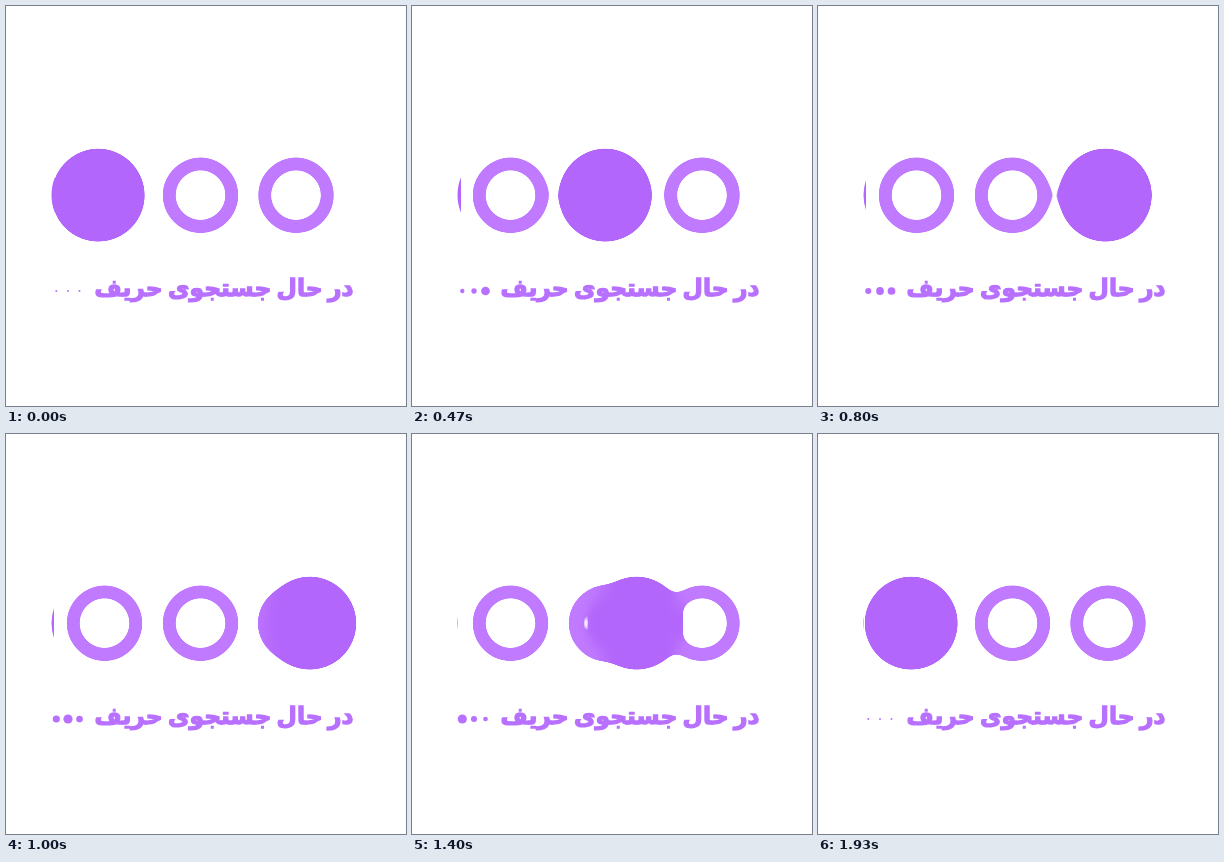
These frames come from a looping animation (400x400 px, 1990 ms). An HTML page:

```html
<!DOCTYPE html>
<html lang="fa">
<head>
<meta charset="utf-8">
<style>
  html, body { margin: 0; width: 100%; height: 100%; overflow: hidden; background: #fff; }
  svg { display: block; width: 400px; height: 400px; }
  text {
    font: bold 25px "DejaVu Sans", "Noto Sans", sans-serif; word-spacing: -.12em;
    direction: rtl; text-anchor: middle; stroke: #b870ff; stroke-width: 1.3;
  }
  .ring { fill: none; stroke: #c07aff; stroke-width: 11; }
  .ball { fill: #b366fb; }
  .label { fill: #b870ff; }
</style>
</head>
<body>
<svg viewBox="0 0 400 400">
  <defs>
    <filter id="goo" filterUnits="userSpaceOnUse" x="0" y="100" width="400" height="180" color-interpolation-filters="sRGB">
      <feGaussianBlur stdDeviation="6.5"/>
      <feColorMatrix values="1 0 0 0 0  0 1 0 0 0  0 0 1 0 0  0 0 0 30 -12.2"/>
    </filter>
    <clipPath id="edge"><rect id="strip" x="40" y="140" height="100"/></clipPath>
  </defs>
  <circle class="ball" cx="92" cy="189" r="46.5" clip-path="url(#edge)"/>
  <g filter="url(#goo)">
    <circle class="ring" cx="98.5" cy="189.2" r="31.9"/>
    <circle class="ring" cx="194.5" cy="189.2" r="31.9"/>
    <circle class="ring" cx="290" cy="189.2" r="31.9"/>
    <circle class="ball" id="ball" cy="189.2" r="45.6"/>
  </g>
  <g class="label">
    <text id="caption" x="218" y="290">در حال جستجوی حریف</text>
    <circle class="dot" cx="73.5" cy="285"/>
    <circle class="dot" cx="62" cy="285"/>
    <circle class="dot" cx="50.3" cy="285"/>
  </g>
</svg>
<script>
const LOOP = 1990, STEPS = 30;
const ball = document.getElementById('ball');
const strip = document.getElementById('strip');
const caption = document.getElementById('caption');
const dots = document.querySelectorAll('.dot');
const peaks = [7.5, 15, 21];

// choose the type size that makes the caption 259 px wide
caption.style.fontSize = 25 * 259 / caption.getComputedTextLength() + 'px';

// rises from 0 to 1 at the peak, then falls back to 0 at the last step
const bump = (n, peak) => n < peak ? n / peak : (STEPS - 1 - n) / (STEPS - 1 - peak);

function draw(now) {
  const t = Math.floor(now % LOOP / 10) * 10;
  const n = Math.min(STEPS - 1, Math.floor((t + 5) * 3 / 200));
  ball.setAttribute('cx', 198 - 106 * Math.cos(n / STEPS * 2 * Math.PI + 0.06));
  // sliver left at the ball's resting place
  strip.setAttribute('width', n < 9 ? 9 : n < 17 ? 8 : 6);
  dots.forEach((dot, i) => dot.setAttribute('r', 1 + 3.6 * bump(n, peaks[i])));
}

const start = performance.now();
function tick() {
  draw(performance.now() - start);
  requestAnimationFrame(tick);
}
tick();
</script>
</body>
</html>
```
